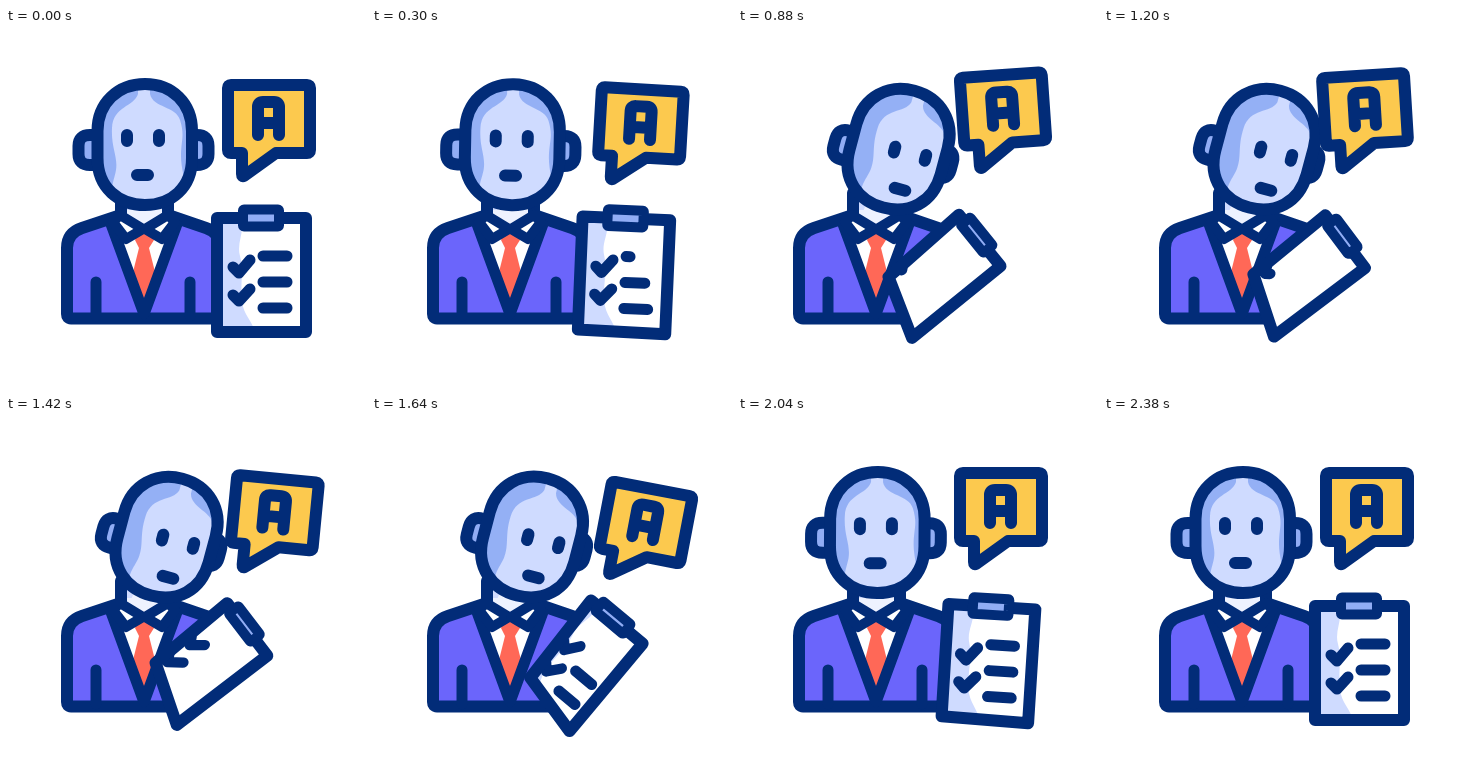
An HTML page that plays this animation: 360x360 px, repeating every 2.4 s.

```html
<!DOCTYPE html>
<html lang="en">
<head>
<meta charset="utf-8">
<title>Assistant with checklist</title>
<style>
html, body { margin: 0; width: 100%; height: 100%; overflow: hidden; background: #fff; }
svg { display: block; width: 100vw; height: 100vh; }
.ink { fill: none; stroke: #022c78; stroke-width: 12; stroke-linecap: round; stroke-linejoin: round; }
.fine { stroke-width: 11; }
.thin { stroke-width: 10; }
.white { fill: #fff; }
.blue { fill: #91adf5; }
</style>
</head>
<body>
<svg viewBox="0 0 360 360">
  <defs>
    <path id="skull" d="M91.5 103C91.5 75 112 56 139 56S186 75 186 103V130C186 160 165 177 139 177S91.5 160 91.5 130Z"/>
    <path id="ear" d="M94 107H84Q72.5 107 72.5 118V126Q72.5 137 84 137H94Z"/>
    <path id="flap" d="M114 187L137 201L120 211L107 194Z"/>
    <clipPath id="skullClip"><use href="#skull"/></clipPath>
    <clipPath id="bodyClip"><polygon id="bodyArea"/></clipPath>
    <clipPath id="sheetClip"><polygon class="sheet"/></clipPath>
  </defs>

  <g clip-path="url(#bodyClip)">
    <path d="M115 165H162V190L138 203L115 190Z" fill="#eef2ff"/>
    <path d="M115 165H133L121 193L115 190Z" fill="#d0dbff"/>
    <path d="M61 290V220Q61 205 76 200L112 188H164L200 200Q215 205 215 220V290Z" fill="#6b65fb"/>
    <path d="M105 194L138 284L171 194L162 187L138 201L114 187Z" fill="#fff"/>
    <path d="M115 182H162L138 200Z" fill="#eef2ff"/>
    <path d="M132 205H145L148 212L143 220L149 244L138 278L127 244L133 220L129 212Z" fill="#ff6857"/>
    <path class="ink" d="M115 165V187L76 200Q61 205 61 220V286Q61 290.5 65 290.5H211Q215 290.5 215 286V220Q215 205 200 200L162 187V165"/>
    <path class="ink fine" d="M90 254V288M184 254V288"/>
    <path class="ink fine" d="M105 196L138 286L171 196"/>
    <use href="#flap" class="ink thin white"/>
    <use href="#flap" class="ink thin white" transform="matrix(-1 0 0 1 276 0)"/>
  </g>

  <g id="head">
    <g id="earL"><use href="#ear" class="ink blue"/></g>
    <g id="earR"><use href="#ear" class="ink blue" transform="matrix(-1 0 0 1 275 0)"/></g>
    <use href="#skull" fill="#94b0f5"/>
    <g clip-path="url(#skullClip)">
      <path id="glow" fill="#cfdbff" d="M132 50V66C128 79 107 78 106 100C105 120 112 128 110 142C108 154 103 158 109 182H176C184 160 175 146 175 128C175 112 179 108 174 92C170 78 147 80 144 66V50Z"/>
    </g>
    <use href="#skull" class="ink"/>
    <path id="face" class="ink" d="M121 107V113M153 107V113M131 147H142"/>
  </g>

  <g id="bubble">
    <path class="ink" fill-rule="evenodd" style="fill:#fcc94e" d="M225 57H301Q304 57 304 60V122Q304 125 301 125H270L238 148Q236 149 236 146V125H225Q222 125 222 122V60Q222 57 225 57Z"/>
    <path class="ink" d="M252 107V79Q252 74 257 74H268Q273 74 273 79V107M252 95H273"/>
  </g>

  <g id="board">
    <polygon class="sheet white"/>
    <g clip-path="url(#sheetClip)">
      <path id="shade" fill="#cfdbff" d="M-110 0H-66C-60 14 -70 24 -66 38C-62 54 -66 66 -64 84C-62 98 -54 102 -50 116H-110Z"/>
    </g>
    <g id="marks">
      <path class="ink fine" pathLength="1" d="M-43 38H-19"/>
      <path class="ink fine" pathLength="1" d="M-43 64H-19"/>
      <path class="ink fine" pathLength="1" d="M-43 90H-19"/>
      <path class="ink fine" pathLength="1" d="M-73 49L-67 55L-56 42"/>
      <path class="ink fine" pathLength="1" d="M-73 77L-67 83L-56 71"/>
    </g>
    <polygon class="sheet ink"/>
    <rect id="clip" class="ink thin blue" width="36" rx="1"/>
  </g>
</svg>
<script>
const LOOP = 2400;
const $ = id => document.getElementById(id);
const sheets = document.querySelectorAll('.sheet');
const marks = [...$('marks').children];

const clamp = v => Math.min(1, Math.max(0, v));
const part = (t, a, b) => clamp((t - a) / (b - a));
const ease = p => (1 - Math.cos(Math.PI * p)) / 2;
// rises over a..b, falls back over c..d
const swing = (t, a, b, c, d) => ease(part(t, a, b)) - ease(part(t, c, d));
const set = (id, value) => $(id).setAttribute('transform', value);

// time, x, y, angle
const sway = [
  [0, 0, 0, 0], [180, 0, 0, 0], [550, 24, 18, 13.4], [880, 2, -10, -4],
  [1060, -3, -13, -9], [1200, -2, -9.5, -3.5], [1640, 11, 15.5, 10.8],
  [2020, 0, 0, 0], [2400, 0, 0, 0]
];

// erase start, erase end, draw start, draw end
const spans = [
  [200, 320, 1640, 1760], [280, 400, 1520, 1630], [360, 490, 1420, 1520],
  [460, 660, 1280, 1430], [660, 910, 1080, 1300]
];

function slope(keys, i, c) {
  if (!i || i === keys.length - 1) return 0;
  const [p, k, n] = [keys[i - 1], keys[i], keys[i + 1]];
  // flat at turning points
  if ((k[c] - p[c]) * (n[c] - k[c]) <= 0) return 0;
  return (n[c] - p[c]) / (n[0] - p[0]);
}

function track(keys, t, c) {
  let i = 0;
  while (i < keys.length - 2 && t >= keys[i + 1][0]) i++;
  const a = keys[i], b = keys[i + 1], d = b[0] - a[0], u = (t - a[0]) / d;
  const h = u * u * (3 - 2 * u);
  return a[c] * (1 - h) + b[c] * h
    + d * u * (1 - u) * ((1 - u) * slope(keys, i, c) - u * slope(keys, i + 1, c));
}

function drawHead(t) {
  const h = swing(t, 180, 870, 1590, 2090);
  set('head', `translate(0 ${1.5 * h}) rotate(${15 * h} 138 201)`);
  set('face', `translate(${14 * h} ${8 * h})`);
  set('glow', `translate(${7 * h} ${2 * h})`);
  set('earL', `translate(${2.5 * h} ${4.5 * h})`);
  set('earR', `translate(${-8 * h} ${-3 * h})`);
}

function drawBubble(t) {
  const [x, y, r] = [1, 2, 3].map(c => track(sway, t, c));
  set('bubble', `translate(${x} ${y}) rotate(${r} 263 91)`);
}

function drawBoard(t) {
  const e = swing(t, 190, 980, 1375, 2175);
  const k = Math.min(1, e * 1.25);
  const w = 89 - 23 * k;
  const ox = 300 - 39 * e, oy = 190 + 50 * e, angle = 53 * e;
  const corners = [[-w, 0], [0, 0], [0, 114], [-w + 4 * e, 114 - 21 * e]];
  set('board', `translate(${ox} ${oy}) rotate(${angle})`);
  sheets.forEach(s => s.setAttribute('points', corners.join(' ')));
  set('shade', `translate(${36 * e * (1 - e)} 0)`);
  set('marks', `translate(${5 * k} 0) scale(${1 - 0.1 * k} 1)`);

  const clip = $('clip'), tall = 17 - 5 * k;
  clip.setAttribute('height', tall);
  clip.setAttribute('x', -63 + 6 * k);
  clip.setAttribute('y', -tall / 2 - k);

  // the body stops at the sheet's left and lower edges
  const a = angle * Math.PI / 180, cos = Math.cos(a), sin = Math.sin(a);
  const [tl, , br, bl] = corners.map(([x, y]) => [ox + x * cos - y * sin, oy + x * sin + y * cos]);
  $('bodyArea').setAttribute('points',
    [[0, 0], [tl[0], 0], tl, bl, br, [br[0], 360], [0, 360]].join(' '));

  marks.forEach((m, i) => {
    const [a0, a1, b0, b1] = spans[i];
    const shown = 1 - part(t, a0, a1) + part(t, b0, b1);
    m.style.display = shown > 0.01 ? '' : 'none';
    m.setAttribute('stroke-dasharray', shown < 1 ? `${shown} 2` : 'none');
  });
}

function render(now) {
  const t = now % LOOP;
  drawHead(t);
  drawBubble(t);
  drawBoard(t);
}

let start;
function tick(now) {
  start ??= now;
  render(now - start);
  requestAnimationFrame(tick);
}
render(0);
requestAnimationFrame(tick);
</script>
</body>
</html>
```
